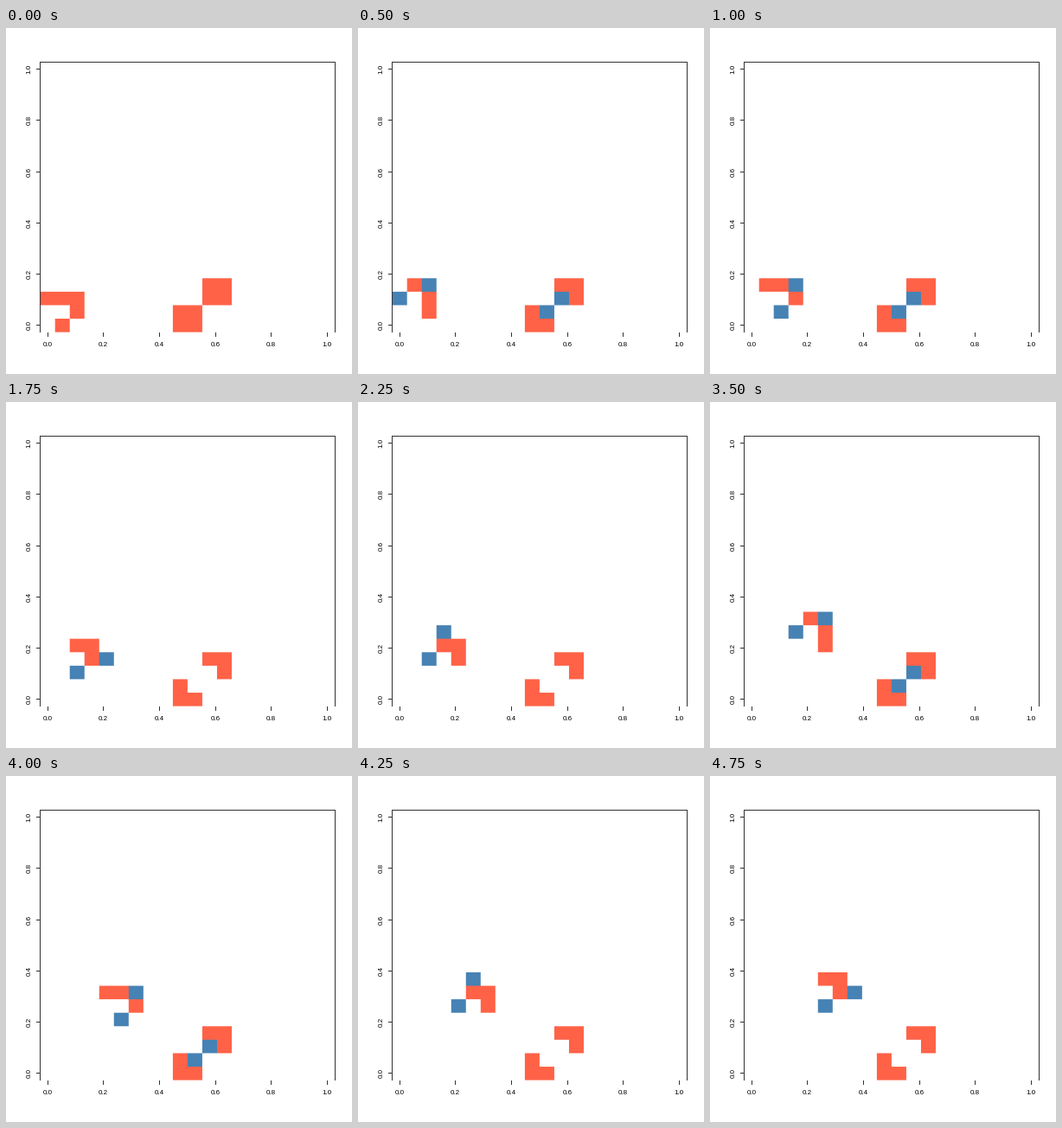
Recreate the animation shown at these times as a matplotlib script. Size 400 by 400 pixels, loop 5000 ms.

```python
import numpy as np
import matplotlib.pyplot as plt
from matplotlib.animation import FuncAnimation
from matplotlib.colors import to_rgb
from matplotlib.patches import Rectangle

SIZE = 400
N = 20
STEPS = 20
LEFT, BOTTOM = 39.66, 351.62
CELL_W, CELL_H = 17.024, 15.584
INK = "#333333"
PALETTE = np.array([to_rgb(c) for c in ("white", "tomato", "steelblue")])

GLIDER = [(1, 0), (2, 1), (0, 2), (1, 2), (2, 2)]
BEACON = [(c + d, r + e) for c, r in ((9, 0), (11, 2))
          for d in (0, 1) for e in (0, 1)]


def evolve(grid):
    p = np.pad(grid, 1)
    near = sum(p[i:i + N, j:j + N] for i in range(3) for j in range(3)) - grid
    return ((near == 3) | ((grid == 1) & (near == 2))).astype(int)


def history():
    """Grids with 0 = dead, 1 = surviving, 2 = newborn; row 0 is at the bottom."""
    grid = np.zeros((N, N), int)
    for c, r in GLIDER + BEACON:
        grid[r, c] = 1
    states = [grid]
    for _ in range(STEPS - 1):
        nxt = evolve(grid)
        states.append(nxt + (nxt & (1 - grid)))
        grid = nxt
    return states


def coverage(edges):
    """Share of each pixel that lies in each cell between the edges."""
    px = np.arange(SIZE)[:, None]
    lo = np.maximum(px, edges[None, :-1])
    hi = np.minimum(px + 1, edges[None, 1:])
    return np.clip(hi - lo, 0, 1)


k = np.arange(N + 1)
COLS = coverage(LEFT + CELL_W * k)
ROWS = coverage(BOTTOM - CELL_H * k[::-1])


def render(state):
    tint = PALETTE[state[::-1]] - 1
    out = 1 + np.einsum("yr,rck,xc->yxk", ROWS, tint, COLS, optimize=True)
    return np.clip(out, 0, 1)


fig = plt.figure(figsize=(4, 4), dpi=100, facecolor="white")
ax = fig.add_axes([0, 0, 1, 1])
ax.axis("off")

states = history()
picture = ax.imshow(render(states[0]), extent=(0, SIZE, SIZE, 0),
                    interpolation="nearest", aspect="auto")
ax.set_xlim(0, SIZE)
ax.set_ylim(SIZE, 0)


def bar(x, y, w, h):
    ax.add_patch(Rectangle((x, y), w, h, fc=INK, lw=0, antialiased=False))


def label(x, y, value, angle=0):
    ax.text(x, y, f"{value:.1f}", rotation=angle, rotation_mode="anchor",
            ha="center", va="baseline", fontsize=5.76,
            family="Liberation Sans", color="black")


# the cells hide the lower side of the frame
bar(39, 39, 342, 1)
bar(39, 39, 1, 313)
bar(380, 39, 1, 313)

for i in range(6):
    x = 48.2 + 64.69 * i
    y = 343.7 - 59.22 * i
    bar(int(x), 352, 1, 5)
    bar(35, int(y), 4, 1)
    label(x - 0.2, 368.2, i / 5)
    label(28.6, y, i / 5, 90)


def update(n):
    picture.set_data(render(states[n % STEPS]))
    return [picture]


anim = FuncAnimation(fig, update, frames=STEPS, interval=250,
                     repeat=True, repeat_delay=0, blit=False)
plt.show()
```
